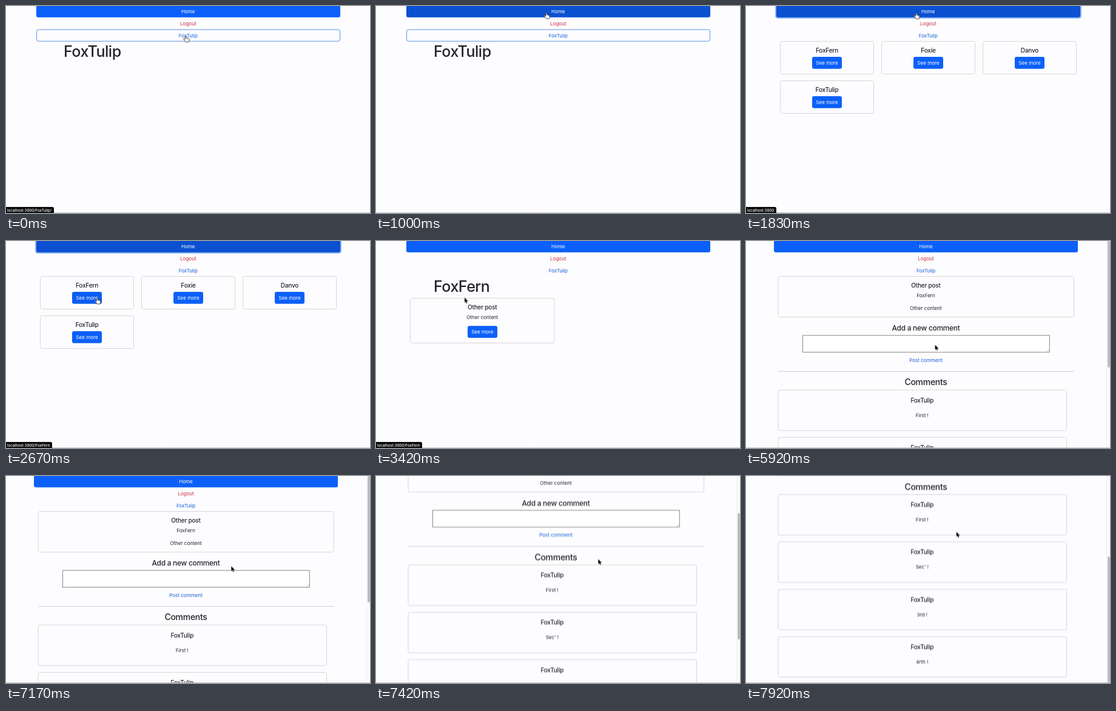
These frames come from a looping animation (600x342 px, 8 s). An HTML page:

```html
<!DOCTYPE html>
<html lang="en">
<head>
<meta charset="utf-8">
<title>Blog walkthrough</title>
<style>
  :root { --blue: #0c60f9; --dark: #0a50d0; --link: #1462d6; --line: #d6d5d8; }
  html, body { margin: 0; width: 100%; height: 100%; overflow: hidden; background: #fdfcfe; }
  body { position: relative; font-family: Inter, "Open Sans", sans-serif; }
  svg { position: absolute; left: 0; top: 0; width: 600px; height: 342px; overflow: hidden; }

  /* 1% of the loop is 80 ms */
  .a { animation: 8s linear infinite; }
  .step { animation: 8s step-end infinite; }

  text { font-size: 8.05px; fill: #212529; text-anchor: middle; }
  .h1, .h3, .h4, .h5 { font-weight: 500; letter-spacing: -.02em; }
  .h1 { font-size: 25px; text-anchor: start; }
  .h3 { font-size: 14px; }
  .h4 { font-size: 11.85px; }
  .h5 { font-size: 10px; }
  .link { fill: var(--link); }
  .danger { fill: #c4303f; }
  .light { fill: #fff; }
  .btn { fill: var(--blue); }
  .card { fill: none; stroke: var(--line); }

  #scroll { animation-name: scroll; }
  #shell { animation-name: shell; }
  #home { animation-name: home; }
  #ring { animation-name: ring; }
  #outline, #profile { animation-name: profile; }
  #list { animation-name: list; }
  #author { animation-name: author; }
  #authorPost { animation-name: authorPost; }
  #pick { animation-name: pick; }
  #open { animation-name: open; }
  #post, #bar { animation-name: post; }
  #postText { animation-name: loaded; }
  #postCard { height: 25.5px; animation-name: grow; }
  #lower { animation-name: push; }
  #thumb { height: 226px; animation-name: thumbSize; }
  #thumbMove { animation-name: thumbMove; }
  #cursor { animation-name: cursor; }
  #hand { animation-name: hand; }
  #arrow { animation-name: arrow; }

  @keyframes profile { 0% { opacity: 1 } 21.5%, 100% { opacity: 0 } }
  @keyframes list { 0% { opacity: 0 } 22.6% { opacity: 1 } 38.3%, 100% { opacity: 0 } }
  @keyframes author { 0% { opacity: 0 } 38.3% { opacity: 1 } 60.2%, 100% { opacity: 0 } }
  @keyframes authorPost { 0% { opacity: 0 } 39.3%, 100% { opacity: 1 } }
  @keyframes post { 0% { opacity: 0 } 60.2%, 100% { opacity: 1 } }
  @keyframes loaded { 0% { opacity: 0 } 62.2%, 100% { opacity: 1 } }
  @keyframes grow { 0% { height: 25.5px } 62.2%, 100% { height: 67.2px } }
  @keyframes push { 0% { transform: none } 62.2%, 100% { transform: translateY(41.7px) } }
  @keyframes thumbSize { 0% { height: 226px } 62.2%, 100% { height: 209px } }
  @keyframes shell { 0% { transform: none } 60.2%, 100% { transform: translateX(-3.8px) } }

  @keyframes home { 0%, 8.8% { fill: var(--blue) } 10.6%, 37.2% { fill: var(--dark) } 39%, 100% { fill: var(--blue) } }
  @keyframes ring { 0%, 18.5% { opacity: 0 } 20.2%, 36.2% { opacity: 1 } 38%, 100% { opacity: 0 } }
  @keyframes pick { 0%, 33% { fill: var(--blue) } 35%, 100% { fill: var(--dark) } }
  @keyframes open { 0%, 49% { fill: var(--blue) } 51%, 100% { fill: var(--dark) } }

  @keyframes scroll {
    0%, 90.5% { transform: none; animation-timing-function: cubic-bezier(.3, .4, .4, 1) }
    98.8%, 100% { transform: translateY(-215.7px) }
  }
  @keyframes thumbMove {
    0%, 90.5% { transform: none; animation-timing-function: cubic-bezier(.3, .4, .4, 1) }
    98.8%, 100% { transform: translateY(133px) }
  }
  @keyframes cursor {
    0%, 2% { transform: translate(296.5px, 49.5px); animation-timing-function: ease-in-out }
    11%, 22.5% { transform: translate(281px, 11px); animation-timing-function: ease-in-out }
    31.5%, 36% { transform: translate(150.5px, 94px) }
    42%, 43.5% { transform: translate(146px, 93.5px); animation-timing-function: ease-in-out }
    50%, 64% { transform: translate(176px, 149px); animation-timing-function: ease-in }
    73% { transform: translate(300px, 176px); animation-timing-function: ease-out }
    83%, 90% { transform: translate(371.3px, 149px); animation-timing-function: ease-in-out }
    98.8%, 100% { transform: translate(346.8px, 92.3px) }
  }
  @keyframes hand {
    0% { opacity: 1 } 24.5% { opacity: 0 } 30.5% { opacity: 1 }
    38.3% { opacity: 0 } 49% { opacity: 1 } 60.2%, 100% { opacity: 0 }
  }
  @keyframes arrow {
    0% { opacity: 0 } 24.5% { opacity: 1 } 30.5% { opacity: 0 }
    38.3% { opacity: 1 } 49% { opacity: 0 } 60.2%, 100% { opacity: 1 }
  }

  .status {
    position: absolute; left: 0; top: 332px; height: 10px; padding: 0 3.5px 0 2px;
    background: #0b0b0c; color: #fff; border-radius: 0 2.5px 0 0;
    font-size: 6.15px; font-weight: 500; line-height: 11px; white-space: nowrap;
  }
  #s1 { animation-name: s1; }
  #s2 { animation-name: s2; }
  #s3 { animation-name: s3; }
  #s4 { animation-name: s4; }
  @keyframes s1 { 0%, 5% { opacity: 1 } 7%, 100% { opacity: 0 } }
  @keyframes s2 { 0%, 13.5% { opacity: 0 } 15%, 29.9% { opacity: 1 } 30%, 100% { opacity: 0 } }
  @keyframes s3 { 0%, 29.9% { opacity: 0 } 30%, 44% { opacity: 1 } 46%, 100% { opacity: 0 } }
  @keyframes s4 { 0%, 49.5% { opacity: 0 } 51%, 63% { opacity: 1 } 65%, 100% { opacity: 0 } }
</style>
</head>
<body>
<svg viewBox="0 0 600 342">
  <defs>
    <rect id="tile" class="card" x="56.5" y="58.5" width="154" height="54" rx="3"/>
    <rect id="button" x="109" y="84" width="49" height="19.7" rx="3"/>
    <rect id="comment" class="card" x="53" y="204.5" width="475.5" height="67" rx="3"/>
  </defs>

  <g id="scroll" class="a">
    <g id="shell" class="step">
      <rect id="ring" class="a" x="48" y="-3" width="505" height="23.8" rx="4.5" fill="#8fb5fb"/>
      <rect id="home" class="a" x="50" y="-.9" width="501" height="19.7" rx="3"/>
      <rect id="outline" class="step" x="50.5" y="39" width="500" height="19.2" rx="3" fill="none" stroke="#5b93e6"/>
      <text class="light" x="300.3" y="12">Home</text>
      <text class="danger" x="300.3" y="31.8">Logout</text>
      <text class="link" x="300.3" y="51.6">FoxTulip</text>
    </g>

    <g id="profile" class="step">
      <text class="h1" x="95" y="83.5">FoxTulip</text>
    </g>

    <g id="list" class="step">
      <g>
        <use href="#tile"/>
        <use id="pick" class="a" href="#button"/>
        <text class="h5" x="133.5" y="77">FoxFern</text>
        <text class="light" x="133.5" y="97">See more</text>
      </g>
      <g transform="translate(167)">
        <use href="#tile"/>
        <use class="btn" href="#button"/>
        <text class="h5" x="133.5" y="77">Foxie</text>
        <text class="light" x="133.5" y="97">See more</text>
      </g>
      <g transform="translate(334)">
        <use href="#tile"/>
        <use class="btn" href="#button"/>
        <text class="h5" x="133.5" y="77">Danvo</text>
        <text class="light" x="133.5" y="97">See more</text>
      </g>
      <g transform="translate(0 65)">
        <use href="#tile"/>
        <use class="btn" href="#button"/>
        <text class="h5" x="133.5" y="77">FoxTulip</text>
        <text class="light" x="133.5" y="97">See more</text>
      </g>
    </g>

    <g id="author" class="step">
      <text class="h1" x="95" y="83.5">FoxFern</text>
      <g id="authorPost" class="step">
        <rect class="card" x="56.5" y="94.5" width="237.5" height="74" rx="3"/>
        <text class="h5" x="175.3" y="112.8">Other post</text>
        <text x="175.3" y="129">Other content</text>
        <use id="open" class="a" href="#button" x="42" y="56.3"/>
        <text class="light" x="175.3" y="153.2">See more</text>
      </g>
    </g>

    <g id="post" class="step">
      <rect id="postCard" class="card step" x="53" y="58.6" width="487.5" rx="3"/>
      <g id="postText" class="step">
        <text class="h5" x="296.5" y="77">Other post</text>
        <text x="296.5" y="93.4">FoxFern</text>
        <text x="296.5" y="114">Other content</text>
      </g>
      <g id="lower" class="step">
        <text class="h4" x="296.5" y="106.8">Add a new comment</text>
        <rect x="93.5" y="114.3" width="406.8" height="27.8" fill="#fff" stroke="#858587"/>
        <path d="M495.5 141l4-4M498 141l1.5-1.5" stroke="#999" stroke-width=".6"/>
        <text class="link" x="296.5" y="158.4">Post comment</text>
        <path d="M53 173.8H541" stroke="#d0cfd2"/>
        <text class="h3" x="296.5" y="196.6">Comments</text>
        <g>
          <use href="#comment"/>
          <text class="h5" x="290.3" y="225">FoxTulip</text>
          <text x="290.3" y="249.2">First !</text>
        </g>
        <g transform="translate(0 78.3)">
          <use href="#comment"/>
          <text class="h5" x="290.3" y="225">FoxTulip</text>
          <text x="290.3" y="249.2">Sec' !</text>
        </g>
        <g transform="translate(0 156.6)">
          <use href="#comment"/>
          <text class="h5" x="290.3" y="225">FoxTulip</text>
          <text x="290.3" y="249.2">3rd !</text>
        </g>
        <g transform="translate(0 234.9)">
          <use href="#comment"/>
          <text class="h5" x="290.3" y="225">FoxTulip</text>
          <text x="290.3" y="249.2">4rth !</text>
        </g>
      </g>
    </g>
  </g>

  <g id="bar" class="step">
    <rect x="594.5" y="-1" width="7" height="344" fill="#fafafa" stroke="#ececee" stroke-width=".7"/>
    <g id="thumbMove" class="a">
      <rect id="thumb" class="step" x="596" width="4" rx="2" fill="#bcbcbe"/>
    </g>
  </g>
  <path d="M0 341.5H600" stroke="#c6c5c8"/>
</svg>

<div id="s1" class="status a">localhost:3000/FoxTulip/</div>
<div id="s2" class="status a">localhost:3000</div>
<div id="s3" class="status a">localhost:3000/FoxFern</div>
<div id="s4" class="status a">localhost:3000/FoxFern/6294ac9166bd35662ef7d4bb</div>

<svg viewBox="0 0 600 342">
  <g id="cursor" class="a">
    <path id="hand" class="step" fill="#fff" stroke="#111" stroke-width=".8" stroke-linejoin="round"
      d="M-1 1a1 1 0 0 1 2 0v2.6l3.2.7q1.3.3 1.2 1.6l-.5 3q-.2 1.2-1.4 1.2h-2.8q-.9 0-1.5-.8l-2.9-4q-.3-.9.6-1.1.7-.1 1.3.6l.8.8z"/>
    <path id="arrow" class="step" fill="#0a0a0a" stroke="#fff" stroke-width=".7" paint-order="stroke"
      d="M0 0v8.2l1.9-1.8 1.3 3 1.4-.6-1.3-2.9h2.6z"/>
  </g>
</svg>
</body>
</html>
```
